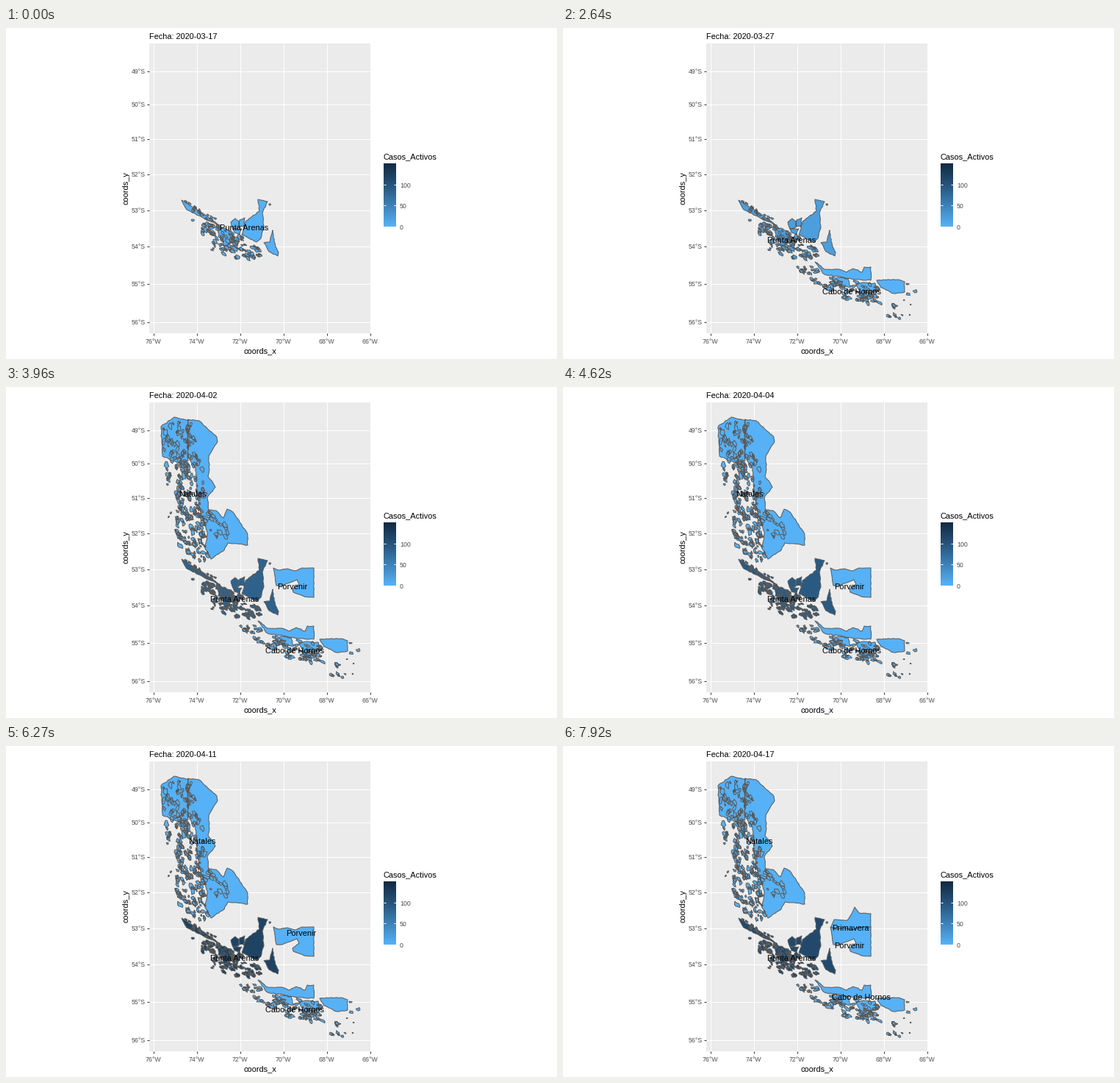
Animation, 750 px wide and 450 px high, one loop 8 s. Source, as a matplotlib script:

```python
import math
import random

import matplotlib.pyplot as plt
import numpy as np
from matplotlib.animation import FuncAnimation
from matplotlib.colors import LinearSegmentedColormap
from matplotlib.patches import PathPatch, Rectangle
from matplotlib.path import Path

W, H, DPI = 750, 450, 100
PX = 72 / DPI
STEP, INTERVAL, FRAMES, LAST = 330, 40, 200, 24

plt.rcParams["font.family"] = "Liberation Sans"
rng = random.Random(11)
blues = LinearSegmentedColormap.from_list(
    "cases", ["#56B1F7", "#438DC7", "#326A98", "#22496C", "#132B43"])

fig = plt.figure(figsize=(W / DPI, H / DPI), dpi=DPI, facecolor="white")
ax = fig.add_axes([0, 0, 1, 1])
ax.axis("off")


def text(x, y, s, size=11, color="black", ha="left"):
    """Text whose capitals are centred on y."""
    return ax.text(x, y + 0.36 * size, s, fontsize=size * PX, color=color,
                   ha=ha, va="baseline", zorder=10)


def line(xs, ys, color, z=2):
    ax.plot(xs, ys, color=color, lw=PX, zorder=z, snap=True,
            solid_capstyle="butt")


def closed(pts):
    """Closed path with a fixed winding, so that overlaps stay filled."""
    pts = np.asarray(pts, float)
    x, y = pts.T
    if np.sum(x * np.roll(y, -1) - y * np.roll(x, -1)) < 0:
        pts = pts[::-1]
    return Path(np.vstack([pts, pts[:1]]), closed=True)


def coast(*pts, amp=0.7, step=3):
    """Polygon with a slightly ragged shoreline."""
    out = []
    for (x0, y0), (x1, y1) in zip(pts, pts[1:] + pts[:1]):
        n = max(1, int(math.hypot(x1 - x0, y1 - y0) / step))
        out.append((x0, y0))
        for j in range(1, n):
            t = j / n
            out.append((x0 + (x1 - x0) * t + rng.uniform(-amp, amp),
                        y0 + (y1 - y0) * t + rng.uniform(-amp, amp)))
    return closed(out)


def island(x, y, size, tilt=0.0, stretch=1.5):
    pts = []
    for j in range(9):
        a = 2 * math.pi * j / 9
        r = size * rng.uniform(0.5, 1.3)
        u, v = r * stretch * math.cos(a), r * math.sin(a)
        pts.append((x + u * math.cos(tilt) - v * math.sin(tilt),
                    y + u * math.sin(tilt) + v * math.cos(tilt)))
    return closed(pts)


def chain(*spine, density=0.036, tilt=0.7, big=2.8):
    """Islands strewn along a spine of (x, y, half width)."""
    out = []
    for (x0, y0, w0), (x1, y1, w1) in zip(spine, spine[1:]):
        length = math.hypot(x1 - x0, y1 - y0)
        nx, ny = (y0 - y1) / length, (x1 - x0) / length
        for _ in range(round(density * length * (w0 + w1))):
            t = rng.random()
            d = (w0 + (w1 - w0) * t) * rng.uniform(-1, 1)
            out.append(island(x0 + (x1 - x0) * t + nx * d,
                              y0 + (y1 - y0) * t + ny * d,
                              rng.uniform(0.8, big),
                              tilt + rng.uniform(-0.5, 0.5), 1.8))
    return out


def region(*paths):
    return ax.add_patch(PathPatch(
        Path.make_compound_path(*paths), facecolor=blues(0.0),
        edgecolor="#595959", lw=PX, joinstyle="round", zorder=4))


# Panel, grid and axes
ax.add_patch(Rectangle((195, 21), 301, 394, fc="#EBEBEB", ec="none", zorder=1))
for j in range(8):
    y = math.floor(58 + 45.3 * j + 0.49 * j * j) + 0.5
    line([195, 496], [y, y], "white")
    line([192, 195], [y, y], "#333333")
    text(190, y, f"{49 + j}°S", 8.8, "#4D4D4D", "right")
for j in range(6):
    x = 200.5 + 59 * j
    line([x, x], [21, 415], "white")
    line([x, x], [415, 418], "#333333")
    text(x, 425.5, f"{76 - 2 * j}°W", 8.8, "#4D4D4D", "center")
text(346, 438.5, "coords_x", ha="center")
ax.text(166.5, 218, "coords_y", fontsize=11 * PX, rotation=90, ha="center",
        va="baseline", rotation_mode="anchor")
title = text(195, 11, "")

# Colour legend
text(514, 174, "Casos_Activos")
ax.imshow(np.linspace(1, 0, 87)[:, None], cmap=blues, aspect="auto",
          extent=(514, 531, 270, 184), zorder=3, interpolation="nearest")
ax.set_xlim(0, W)
ax.set_ylim(H, 0)
for value in (0, 50, 100):
    y = 269.5 - 0.57 * value
    line([514, 517.4], [y, y], "white", 5)
    line([527.6, 531], [y, y], "white", 5)
    text(536, y + 1, str(value), 8.8, "#4D4D4D")

punta = region(
    coast((343, 233), (356, 236), (349, 252), (351, 272), (347, 286),
          (341, 291), (321, 281), (326, 263), (345, 249)),
    coast((306, 264), (312, 259), (317, 263), (317, 271), (309, 273)),
    coast((318, 261), (325, 258), (324, 270), (318, 270)),
    coast((309, 273), (321, 273), (318, 280), (311, 278)),
    coast((363, 275), (365, 290), (371, 305), (370, 310), (358, 304),
          (351, 292), (359, 291)),
    coast((239, 234), (263, 248), (290, 268), (268, 258), (246, 247)),
    coast((290, 270), (305, 276), (310, 290), (298, 297), (289, 284), amp=1.5),
    island(359, 240, 1.2), island(254, 261, 1.5),
    *chain((241, 236, 3), (262, 250, 4), (290, 267, 6), big=1.8),
    *chain((266, 270, 6), (290, 283, 15), (312, 299, 17), (346, 306, 8)),
    *chain((276, 299, 2), (294, 302, 3), big=1.8))

cabo = region(
    coast((343, 318), (356, 328), (376, 328), (386, 332), (395, 327),
          (407, 332), (410, 325), (419, 325), (419, 343), (399, 342),
          (356, 335)),
    coast((427, 343), (456, 342), (465, 345), (465, 359), (450, 361),
          (433, 353)),
    coast((400, 347), (425, 347), (431, 356), (404, 363), amp=1.4),
    coast((366, 338), (388, 341), (392, 352), (372, 350), amp=1.4),
    island(470, 362, 2.2), island(480, 358, 2.2), island(469, 348, 1.2),
    island(464, 370, 0.6), island(473, 376, 0.6), island(472, 390, 0.6),
    *chain((317, 328, 5), (346, 328, 7), tilt=0.4),
    *chain((337, 342, 3), (360, 347, 8), (395, 357, 14), (430, 358, 10),
           density=0.03, tilt=0.3),
    *chain((408, 368, 5), (435, 377, 4)),
    *chain((448, 376, 3), (457, 388, 6), (461, 394, 3), big=2.2),
    *chain((441, 391, 2), (455, 391, 3), big=1.8))

natales = region(
    coast((248, 44), (263, 46), (272, 54), (287, 68), (288, 74), (276, 94),
          (277, 112), (275, 121), (285, 136), (274, 150), (276, 167),
          (286, 168), (296, 178), (301, 166), (309, 170), (329, 200),
          (329, 215), (302, 212), (297, 222), (279, 234), (271, 220),
          (274, 197), (262, 160), (258, 110), (247, 95)),
    coast((211, 54), (229, 41), (248, 45), (248, 100), (234, 103), (213, 94)),
    *chain((230, 47, 16), (231, 75, 19), (232, 102, 15), density=0.024,
           tilt=1.5),
    *chain((249, 50, 3), (256, 90, 7), (265, 150, 8), density=0.024, tilt=1.4),
    *chain((221, 104, 4), (221, 138, 3), tilt=1.2),
    *chain((239, 106, 9), (246, 135, 14), (248, 165, 18), (251, 190, 21),
           (256, 215, 19), (271, 234, 6), tilt=1.1),
    *chain((274, 170, 4), (285, 192, 11), (303, 198, 7), density=0.024,
           tilt=0.9),
    *chain((222, 178, 1), (227, 165, 2), tilt=2, big=1.8))

porvenir = region(coast(
    (364, 246), (371, 249), (383, 247), (394, 250), (403, 246), (419, 246),
    (419, 286), (406, 285), (391, 279), (390, 275), (399, 268), (396, 262),
    (376, 270), (368, 270), amp=0.3))
primavera = region(coast(
    (397, 219), (403, 227), (419, 228), (419, 246), (403, 246), (394, 250),
    (383, 247), (371, 249), (365, 246), (369, 236), (387, 237), (393, 228),
    amp=0.3))

# Area, name, two label anchors, steps spent at the second one, first step
PLACES = [
    (punta, "Punta Arenas", (311, 288), (324, 271), (0, 2, 4), 0),
    (cabo, "Cabo de Hornos", (393, 358), (406, 341), (6, 7, 10, 16, 23, 24), 2),
    (natales, "Natales", (254, 145), (267, 129), range(18, 25), 9),
    (porvenir, "Porvenir", (389.5, 271), (402, 254), range(18, 23), 9),
    (primavera, "Primavera", (391, 247), (391, 247), (), LAST),
]
labels = [text(0, 0, place[1], ha="center") for place in PLACES]


def date_at(i):
    day = 17 + int(31 * i / LAST + 0.5)
    return f"2020-03-{day:02d}" if day <= 31 else f"2020-04-{day - 31:02d}"


def cases_at(i):
    return np.interp(i, [0, 8, 12, 17, 22, 24], [1, 20, 84, 107, 140, 112])


def draw(k):
    i = min(LAST, (k * INTERVAL + INTERVAL - 1) // STEP)
    title.set_text("Fecha: " + date_at(i))
    punta.set_facecolor(blues(float(cases_at(i)) / 150))
    for label, (area, _, a, b, second, start) in zip(labels, PLACES):
        x, y = b if i in second else a
        label.set_position((x, y + 4))
        label.set_visible(i >= start)
        area.set_visible(i >= start)
    return [title, *labels]


anim = FuncAnimation(fig, draw, frames=FRAMES, interval=INTERVAL,
                     init_func=lambda: draw(0), repeat=True, repeat_delay=0,
                     blit=False)
plt.show()
```
